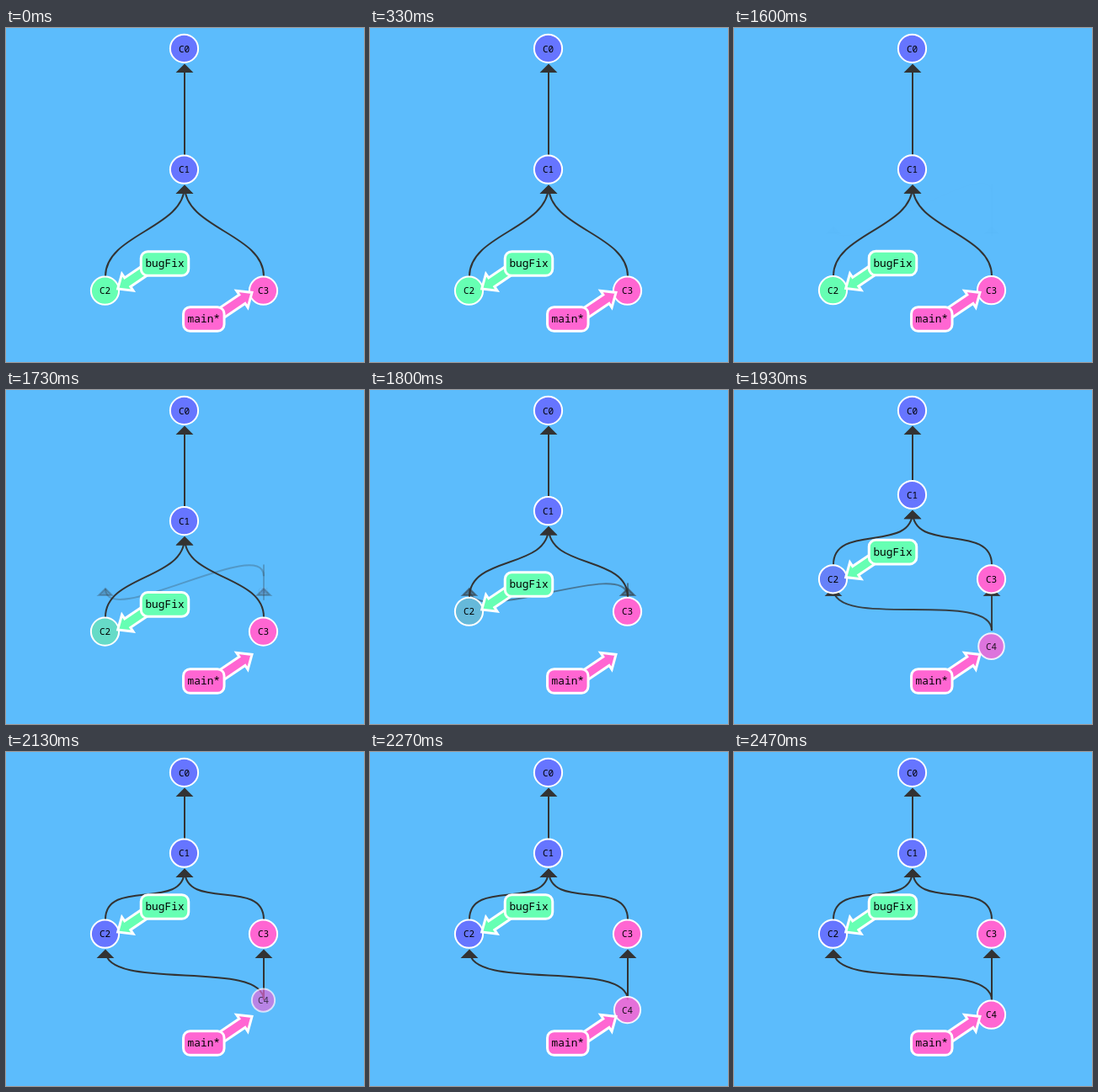
Animation, 425 px wide and 397 px high, one loop 2.54 s. Source, as an HTML page with a canvas:

```html
<!DOCTYPE html>
<html lang="en">
<head>
<meta charset="utf-8">
<title>Merge</title>
<style>
  html, body { margin: 0; width: 100%; height: 100%; overflow: hidden; background: #5cbcfc; }
  canvas { display: block; width: 425px; height: 397px; }
</style>
</head>
<body>
<canvas id="stage"></canvas>
<script>
const W = 425, H = 397, LOOP = 2540;
const START = 1600, STEP = 200 / 3;
const MOVE = 400, BOUNCE = 800;
const BLUE = [102, 117, 255], GREEN = [102, 255, 179], PINK = [255, 102, 210];
const INK = '#333', R = 16.6, FONT = '"Noto Sans Mono", "DejaVu Sans Mono", monospace';
const LEFT = 118, MID = 212, RIGHT = 306;

// [step, elapsed ms] of the uneven animation clock
const CLOCK = [[0, 20], [3, 202], [5, 316], [8, 514], [13, 822]];

const canvas = document.getElementById('stage');
const ctx = canvas.getContext('2d');
const dpr = window.devicePixelRatio || 1;
canvas.width = Math.round(W * dpr);
canvas.height = Math.round(H * dpr);

const lerp = (a, b, p) => a + (b - a) * p;
const mix = (a, b, p) => a.map((v, i) => lerp(v, b[i], p));
const rgb = c => `rgb(${c.map(Math.round).join(',')})`;
const clamp = p => Math.min(1, Math.max(0, p));

function easeInOut(n) {
  if (n <= 0 || n >= 1) return clamp(n);
  const q = 0.48 - n / 1.04;
  const root = Math.sqrt(0.1734 + q * q);
  const s = Math.cbrt(root - q) + Math.cbrt(-root - q) + 0.5;
  return 3 * (1 - s) * s * s + s * s * s;
}

function bounce(n) {
  const k = 7.5625, p = 2.75;
  if (n >= 1) return 1;
  if (n < 1 / p) return k * n * n;
  if (n < 2 / p) return k * (n - 1.5 / p) ** 2 + 0.75;
  if (n < 2.5 / p) return k * (n - 2.25 / p) ** 2 + 0.9375;
  return k * (n - 2.625 / p) ** 2 + 0.984375;
}

function elapsedAt(t) {
  if (t < START) return 0;
  const step = Math.floor((t - START + 5) / STEP);
  for (let i = 1; i < CLOCK.length; i++) {
    const [s0, e0] = CLOCK[i - 1], [s1, e1] = CLOCK[i];
    if (step <= s1) return lerp(e0, e1, (step - s0) / (s1 - s0));
  }
  return BOUNCE;
}

// Curve from the top of the child to an arrowhead under the parent
function edge(x0, y0, x1, y1, alpha = 1) {
  ctx.globalAlpha = alpha;
  ctx.strokeStyle = ctx.fillStyle = INK;
  ctx.lineWidth = 2;
  ctx.beginPath();
  ctx.moveTo(x0, y0);
  ctx.bezierCurveTo(x0, y0 - 50, x1, y1 + 50, x1, y1);
  ctx.stroke();
  ctx.beginPath();
  ctx.moveTo(x1, y1);
  ctx.lineTo(x1 - 8, y1 + 8);
  ctx.lineTo(x1 + 8, y1 + 8);
  ctx.closePath();
  ctx.fill();
  ctx.stroke();
  ctx.globalAlpha = 1;
}

function text(str, x, y, size, weight = 400) {
  ctx.font = `${weight} ${size}px ${FONT}`;
  ctx.textAlign = 'center';
  ctx.fillStyle = '#000';
  ctx.fillText(str, x, y);
}

function node(name, x, y, color, scale = 1) {
  ctx.globalAlpha = scale * scale;
  ctx.beginPath();
  ctx.arc(x - 0.5, y + 0.2, R * scale, 0, Math.PI * 2);
  ctx.fillStyle = rgb(color);
  ctx.fill();
  ctx.strokeStyle = '#fff';
  ctx.lineWidth = 2;
  ctx.stroke();
  text(name, x - 0.5, y + 4.4, 11, 500);
  ctx.globalAlpha = 1;
}

function label(str, x, y, w, tipX, tipY, angle, color) {
  ctx.fillStyle = rgb(color);
  ctx.strokeStyle = '#fff';
  ctx.lineWidth = 3;

  ctx.save();
  ctx.translate(tipX, tipY);
  ctx.rotate(angle);
  ctx.beginPath();
  ctx.moveTo(0, 0);
  ctx.lineTo(14, -12);
  ctx.lineTo(14, -6.3);
  ctx.lineTo(44, -6.3);
  ctx.lineTo(44, 6.3);
  ctx.lineTo(14, 6.3);
  ctx.lineTo(14, 12);
  ctx.closePath();
  ctx.fill();
  ctx.stroke();
  ctx.restore();

  ctx.beginPath();
  ctx.roundRect(x - w / 2, y - 14.3, w, 28.6, 8);
  ctx.fill();
  ctx.stroke();
  text(str, x, y + 4.3, 12.83);
}

function draw(t) {
  const e = elapsedAt(t);
  const move = easeInOut(e / MOVE);
  const drop = bounce(e / BOUNCE);
  const y1 = lerp(168, 120, move);
  const y2 = lerp(312, 216, move);

  ctx.setTransform(dpr, 0, 0, dpr, 0, 0);
  ctx.fillStyle = '#5cbcfc';
  ctx.fillRect(0, 0, W, H);

  edge(MID, y1 - 17, MID, 44);
  edge(LEFT, y2 - 17, MID, y1 + 20);
  edge(RIGHT, y2 - 17, MID, y1 + 20);
  if (e > 0) {
    const tail = lerp(195, 295, move);
    edge(RIGHT, tail, LEFT, 236, move);
    edge(RIGHT, tail, RIGHT, 236, move);
    node('C4', RIGHT, lerp(216, 312, drop), mix(BLUE, PINK, drop), drop);
  }

  node('C0', MID, 24.2, BLUE);
  node('C1', MID, y1, BLUE);
  node('C2', LEFT, y2, mix(GREEN, BLUE, move));
  node('C3', RIGHT, y2, PINK);

  const tilt = 34 * Math.PI / 180;
  label('bugFix', 188.5, y2 - 32, 56.5, 132.7, y2 - 2, -tilt, GREEN);
  label('main*', 234.8, 346, 48.5, 292, 314.4, Math.PI - tilt, PINK);
}

const begin = performance.now();
function tick() {
  draw((performance.now() - begin) % LOOP);
  requestAnimationFrame(tick);
}
tick();
</script>
</body>
</html>
```
